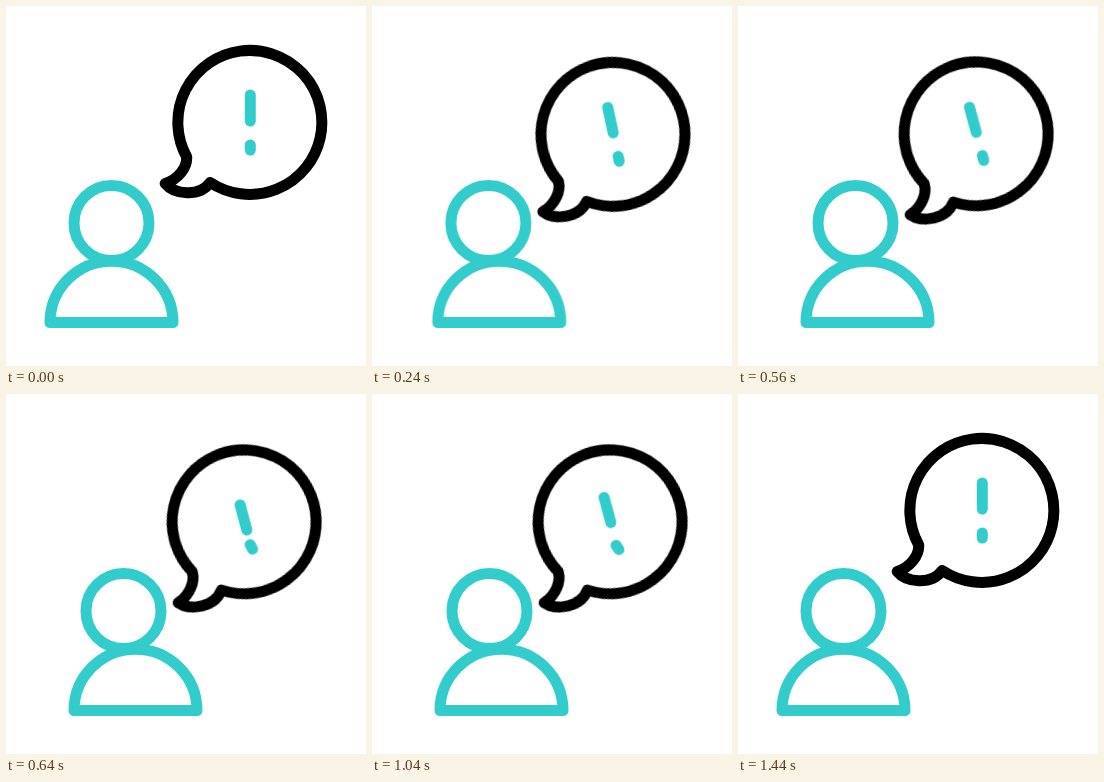
Recreate the animation shown at these times as an HTML page. Size 360 by 360 pixels, loop 1480 ms.

```html
<!DOCTYPE html>
<html lang="en">
<head>
<meta charset="utf-8">
<title>Alert message</title>
<style>
  html, body { margin: 0; height: 100%; overflow: hidden; background: #fff; }
  svg { display: block; width: 100%; height: 100%; }
  path, circle { fill: none; stroke: #33cccc; stroke-width: 11; stroke-linecap: round; stroke-linejoin: round; }
  .outline { stroke: #000; }

  /* The script scrubs --t in 40 ms steps. */
  .move {
    animation: 1480ms ease-in-out infinite paused;
    animation-delay: calc(var(--t, 0) * -1ms);
  }
  .head { --dx: 12px; --dy: 0px; animation-name: shift; }
  .body { --dx: 24px; --dy: 0px; animation-name: shift; }
  .bubble { --dx: 12.4px; --dy: 30.6px; animation-name: shift; }
  .swing { transform-origin: 161.9px 175.5px; animation-name: swing; }
  .bar { animation-name: hammer; }
  .dot { transform-origin: 244.3px 141.5px; animation-name: tilt; }

  @keyframes shift {
    0%, 5.41% { transform: none; }
    19.19% { transform: translate(var(--dx), var(--dy)); }
    70.27% { transform: translate(var(--dx), var(--dy)); animation-timing-function: cubic-bezier(.42, 0, .41, 1); }
    93.24%, 100% { transform: none; }
  }
  @keyframes swing {
    0%, 5.41% { transform: rotate(0deg); }
    21.08% { transform: rotate(-15deg); }
    27.03% { transform: rotate(7.2deg); }
    33.11% { transform: rotate(-15deg); }
    70.27% { transform: rotate(-15deg); animation-timing-function: cubic-bezier(.42, 0, .3, 1); }
    93.24%, 100% { transform: rotate(0deg); }
  }
  @keyframes hammer {
    0%, 37.84%, 48.65%, 59.46%, 72.97%, 100% { transform: translateY(0); }
    43.24%, 54.05%, 64.86% { transform: translateY(10px); }
  }
  @keyframes tilt {
    0%, 37.84%, 59.46%, 74.32%, 100% { transform: translateY(0) rotate(0deg); }
    48.65%, 68.24% { transform: translateY(2px) rotate(-25deg); }
  }
</style>
</head>
<body>
<svg viewBox="0 0 360 360">
  <circle class="move head" cx="105.5" cy="217" r="37.5"/>
  <path class="move body" d="M44 316.6A61.5 61.5 0 0 1 167 316.6Z"/>
  <g class="move bubble">
    <g class="move swing">
      <path class="outline" d="M180.7 151C181.2 161.5 172.2 173.5 159.2 177.5C168.2 188.5 193.2 191.5 204.2 176.5A72 72 0 1 0 180.7 151Z"/>
      <path class="move bar" d="M244.3 89V115"/>
      <path class="move dot" d="M244.3 139V144"/>
    </g>
  </g>
</svg>
<script>
  const LOOP = 1480, STEP = 40;
  const start = performance.now();

  function tick() {
    const t = (performance.now() - start) % LOOP;
    document.documentElement.style.setProperty('--t', Math.floor(t / STEP) * STEP);
    requestAnimationFrame(tick);
  }
  tick();
</script>
</body>
</html>
```
